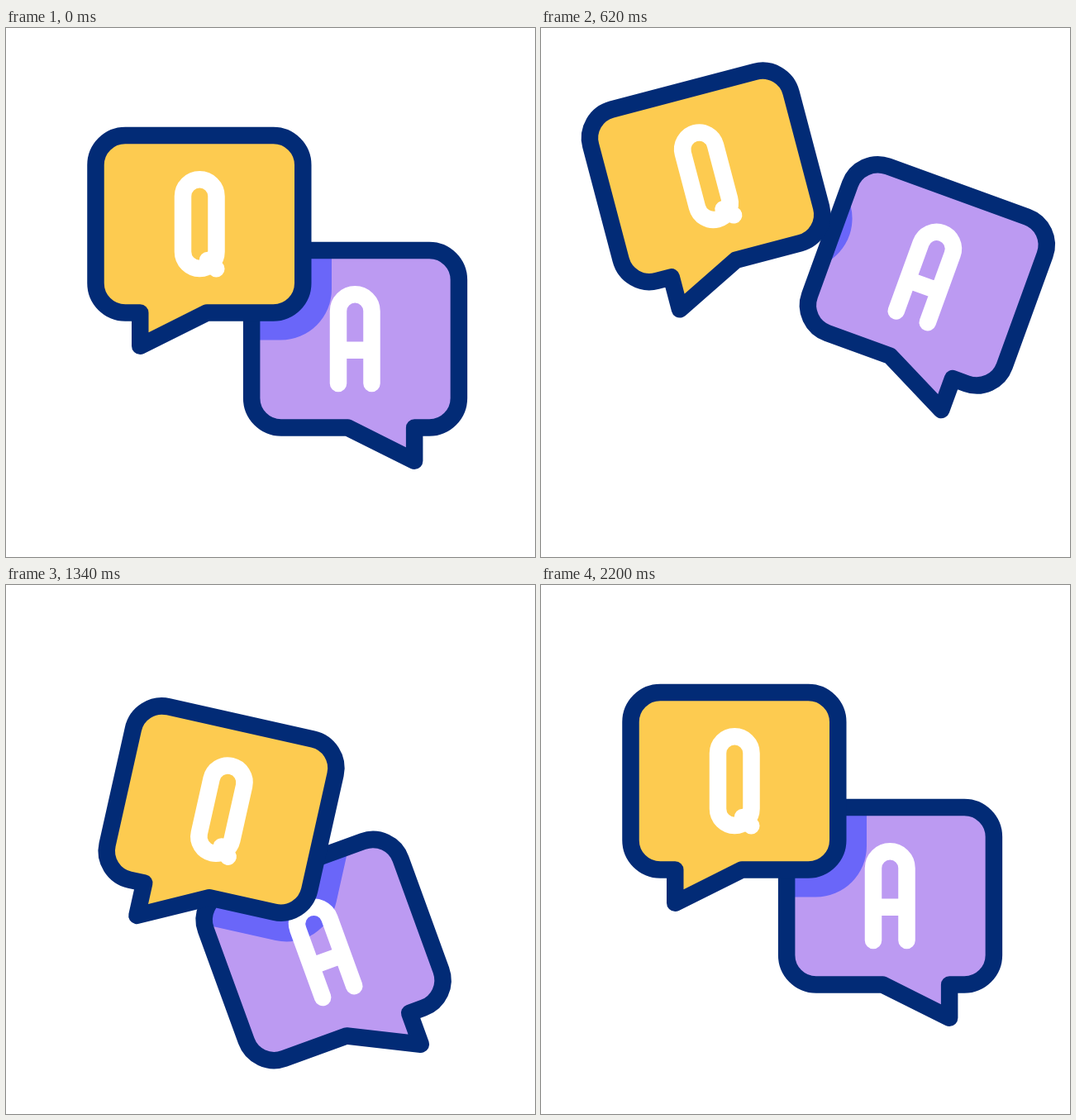
Write an HTML page with a canvas that moves like this. It is 640 px wide and 640 px high and loops after 2.22 s.

```html
<!DOCTYPE html>
<html lang="en">
<head>
<meta charset="utf-8">
<title>Question and answer</title>
<style>
  html, body { margin: 0; width: 100%; height: 100%; overflow: hidden; background: #fff; }
  canvas { display: block; }
</style>
</head>
<body>
<canvas id="stage" width="640" height="640"></canvas>
<script>
const ctx = document.getElementById('stage').getContext('2d');
const NAVY = '#022b76', YELLOW = '#fdcb50', PURPLE = '#bc9af2', BLUE = '#6a66f9';
const LOOP = 2220;

// Shapes are laid out at their resting place on the stage
const questionBody = new Path2D(
  'M243 344.5H323.5a35.75 35.75 0 0 0 35.75 -35.75V165.75a35.75 35.75 0 0 0 -35.75 -35.75' +
  'H144.25a35.75 35.75 0 0 0 -35.75 35.75V308.75a35.75 35.75 0 0 0 35.75 35.75H162.25V384.8Z');
const answerBody = new Path2D();
answerBody.addPath(questionBody, new DOMMatrix([-1, 0, 0, 1, 656.4, 139]));

const letterQ = new Path2D(
  'M214 203.6a20.25 20.25 0 0 1 40.5 0V270.8a20.25 20.25 0 0 1 -40.5 0ZM244 281L254.3 291.2');
const letterA = new Path2D('M402 430V342.5a20.25 20.25 0 0 1 40.5 0V430M402 389.75H442.5');

const shadow = new Path2D();
shadow.roundRect(84, 95, 310, 282.5, 61.5);

// Each key: time, lean from -1 to 1, vertical shift
const keys = [[0, 0, 0], [633, 1, -66.5], [1333, -1, 39.7], [2000, 0, 0]];

function pose(time) {
  if (time <= 0 || time >= 2000) return { lean: 0, shift: 0 };
  const i = keys.findIndex(key => key[0] > time);
  const [t0, lean0, shift0] = keys[i - 1], [t1, lean1, shift1] = keys[i];
  const u = (time - t0) / (t1 - t0), ease = u * u * (3 - 2 * u);
  return { lean: lean0 + (lean1 - lean0) * ease, shift: shift0 + (shift1 - shift0) * ease };
}

function place(x, y, degrees, { lean, shift }) {
  return new DOMMatrix().translate(x, y + shift).rotate(degrees * lean).translate(-x, -y);
}

function stroke(path, color) {
  ctx.strokeStyle = color;
  ctx.stroke(path);
}

function fill(path, color) {
  ctx.fillStyle = color;
  ctx.fill(path);
}

function draw(time) {
  const question = place(183, 365, -20, pose(time - 200));
  const answer = place(476, 498, 20, pose(time));

  ctx.resetTransform();
  ctx.fillStyle = '#fff';
  ctx.fillRect(0, 0, 640, 640);
  ctx.lineWidth = 20.5;
  ctx.lineCap = ctx.lineJoin = 'round';

  ctx.setTransform(answer);
  fill(answerBody, PURPLE);
  ctx.save();
  ctx.clip(answerBody);
  ctx.setTransform(question);
  fill(shadow, BLUE);
  ctx.restore();
  stroke(answerBody, NAVY);
  stroke(letterA, '#fff');

  ctx.setTransform(question);
  fill(questionBody, YELLOW);
  stroke(questionBody, NAVY);
  stroke(letterQ, '#fff');
}

const start = performance.now();
function tick() {
  draw((performance.now() - start) % LOOP);
  requestAnimationFrame(tick);
}
tick();
</script>
</body>
</html>
```
